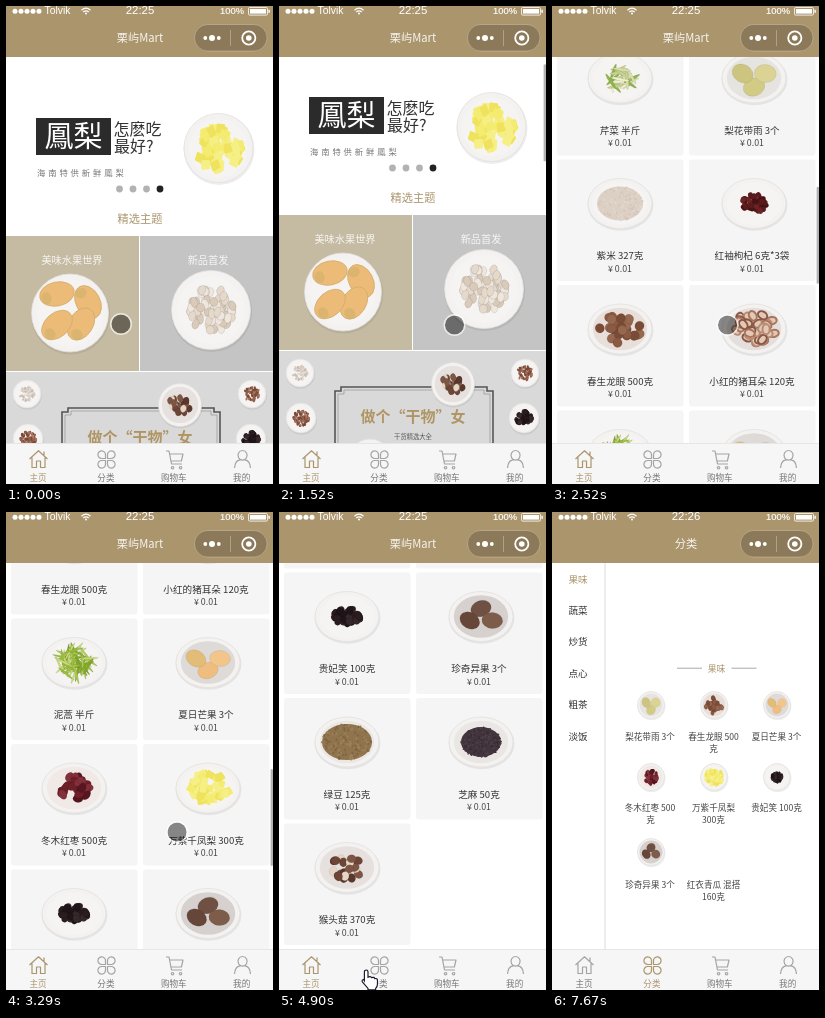
An HTML page for the animation above (7.99 s loop, 267 by 478 pixels).

```html
<!DOCTYPE html>
<html lang="zh">
<head>
<meta charset="utf-8">
<title>Shop</title>
<style>
html,body{margin:0;width:100%;height:100%;overflow:hidden;background:#fff}
svg{display:block;width:100vw;height:100vh}
text{font-family:"Noto Sans CJK SC","Noto Sans CJK",Inter,sans-serif;white-space:pre}
.bar{font-family:"Liberation Sans",Arial,sans-serif}
</style>
</head>
<body>
<svg id="stage" viewBox="0 0 267 478"></svg>
<script>
const LOOP = 7990, STEP = 76.875;
const GOLD = '#ab956d', GREY = '#a4a4a4';
const $ = id => document.getElementById(id);

let seed = 7;
const rnd = () => (seed = (seed * 16807) % 2147483647) / 2147483647;

// ---- drawing helpers ----
const txt = (x, y, size, fill, s, more = '') =>
  `<text x="${x}" y="${(y + size * .36).toFixed(1)}" font-size="${size}" fill="${fill}" text-anchor="middle" ${more}>${s}</text>`;
const rect = (x, y, w, h, fill, more = '') =>
  `<rect x="${x}" y="${y}" width="${w}" height="${h}" fill="${fill}" ${more}/>`;
const dot = (x, y, r, fill, more = '') =>
  `<circle cx="${x}" cy="${y}" r="${r}" fill="${fill}" ${more}/>`;
const oval = (x, y, rx, ry, fill, more = '') =>
  `<ellipse cx="${x}" cy="${y}" rx="${rx}" ry="${ry}" fill="${fill}" ${more}/>`;
const line = (d, stroke, w = 1, more = '') =>
  `<path d="${d}" fill="none" stroke="${stroke}" stroke-width="${w}" ${more}/>`;

// pieces, half width, half height, spread x, spread y, colours, shape, plate tint
const FOOD = {
  celery: [30, 9, 1.4, 12, 10, '#d9dfa6 #c6d28e #eef0cf #8fb54a'],
  pear: [3, 11, 9, 13, -9, '#d2cb85 #dad394 #cdc57f', '', '#e6e4e0'],
  rice: [150, 1.3, .8, 23, 17, '#dccfc3 #d4c5b8 #e3d8ce', 'grain'],
  goji: [40, 3.4, 2.6, 12, 9, '#5c1a1c #6b2423 #471316'],
  longan: [30, 4.8, 4.6, 21, 15, '#8a5a43 #976850 #7a4c36', '', '#e9dfda'],
  ears: [34, 5, 3.6, 23, 15, '#a8745c #b88b74 #8a5745', 'ring', '#e4dfdc'],
  wormwood: [56, 10, 1, 16, 13, '#9cc13a #aecb52 #84ad2c #c9dc7c'],
  mango: [3, 10.5, 8, 14, -8, '#efbd80 #f2c68a #e3bd78', '', '#dedad8'],
  date: [30, 5, 3.8, 15, 12, '#6e1f28 #82303a #571620', '', '#f0e9e6'],
  pine: [56, 4, 3.4, 21, 15, '#f4ec70 #f6ef86 #efe25c', 'cube'],
  black: [44, 3.8, 3.2, 13, 9, '#2a1c20 #36272b #1f1518'],
  kiwi: [3, 10.5, 8, 13, 8, '#6f5043 #7d5c4a #664638', '', '#d6d1cf'],
  bean: [200, 1.4, 1, 25, 18, '#8f744e #9c815a #806541', 'grain', '#ebe7e4'],
  sesame: [200, 1.1, .8, 20, 15, '#43353e #50414a #382b34', 'grain', '#e9e6e4'],
  mushroom: [22, 4.6, 4, 16, 11, '#6d4638 #7d5545 #5b382c #e6d6c6', '', '#e6e1de'],
  nut: [80, 3.3, 2.7, 18, 14, '#e5d9cc #efe7dd #dacab9'],
  pale: [60, 2.6, 1.8, 17, 13, '#dccfc5 #e6dcd3 #cfc2b6'],
  spice: [60, 3.2, 2.2, 17, 13, '#94604b #a8745c #7d4a38'],
};

function heap(kind) {
  const [n, w, h, sx, sy, cols, shape] = FOOD[kind], col = cols.split(' ');
  const few = n < 5, grain = shape === 'grain';
  const edge = grain ? '' : 'stroke="#000" stroke-opacity=".1" stroke-width=".6"';
  let out = grain ? oval(0, 0, sx, sy, col[0]) : '';
  for (let i = 0; i < n; i++) {
    const a = few ? i * 2 * Math.PI / n - Math.PI / 2 : rnd() * 7;
    const r = few ? 1 : Math.sqrt(rnd());
    const x = (Math.cos(a) * r * sx).toFixed(1), y = (Math.sin(a) * r * sy).toFixed(1);
    const c = col[i % col.length];
    const turn = `transform="translate(${x} ${y}) rotate(${few ? -20 + i * 25 : rnd() * 180 | 0})"`;
    if (shape === 'cube') out += rect(-w, -h, 2 * w, 2 * h, c, `rx="1" ${turn}`);
    else if (shape === 'ring') out += oval(0, 0, w, h, '#e2c8b5', `stroke="${c}" stroke-width="2" ${turn}`);
    else out += oval(0, 0, w, h, c, `${turn} ${edge}`);
  }
  return out;
}

function plate(x, y, rx, ry, kind, k = 1) {
  const tint = FOOD[kind][7] || '#f6f4f3';
  return `<g transform="translate(${x} ${y})">` +
    oval(.5, 1.4, rx * 1.03, ry * 1.03, '#000', 'opacity=".07"') +
    oval(0, 0, rx, ry, '#f4f2f0', 'stroke="#e4e0dd" stroke-width=".8"') +
    oval(0, 0, rx * .85, ry * .85, tint) +
    (k ? `<g transform="scale(${(rx / 32 * k).toFixed(3)} ${(ry / 25 * k).toFixed(3)})">${heap(kind)}</g>` : '') + '</g>';
}

// ---- home page ----
const GOODS = [
  ['芹菜 半斤', 'celery'], ['梨花带雨 3个', 'pear'],
  ['紫米 327克', 'rice'], ['红袖枸杞 6克*3袋', 'goji'],
  ['春生龙眼 500克', 'longan'], ['小红的猪耳朵 120克', 'ears'],
  ['泥蒿 半斤', 'wormwood'], ['夏日芒果 3个', 'mango'],
  ['冬木红枣 500克', 'date'], ['万紫千凤梨 300克', 'pine'],
  ['贵妃笑 100克', 'black'], ['珍奇异果 3个', 'kiwi'],
  ['绿豆 125克', 'bean'], ['芝麻 50克', 'sesame'],
  ['猴头菇 370克', 'mushroom'],
];

function home() {
  let s = rect(30, 112, 75, 37, '#2b2b2b') +
    txt(67.5, 130.5, 29, '#fff', '鳳梨') +
    txt(131.5, 123.5, 16, '#333', '怎麽吃', 'font-weight="500"') +
    txt(108, 140.5, 16, '#333', '最好?', 'font-weight="500" style="text-anchor:start"') +
    txt(31, 166.5, 8.3, '#777', '海南特供新鲜鳳梨', 'letter-spacing="2.9" style="text-anchor:start"') +
    plate(212.5, 142, 34.5, 34.5, 'pine');
  [113.5, 127, 140.5, 154].forEach((x, i) => s += dot(x, 183, 3.4, i < 3 ? '#b2b2b2' : '#222'));
  s += txt(134, 213, 11.2, GOLD, '精选主题');

  s += rect(0, 230, 133, 135, '#c5bba3') + rect(134, 230, 133, 135, '#c4c4c4') +
    txt(66, 254, 10.2, '#fff', '美味水果世界', 'opacity=".85"') +
    txt(202, 254, 10.2, '#fff', '新品首发', 'opacity=".85"') +
    plate(64, 307, 38.5, 39, 'nut', 0);
  [[51, 288, -12], [82, 296, 62], [75, 318, -58], [51, 319, -42]].forEach(([x, y, a]) =>
    s += `<g transform="translate(${x} ${y}) rotate(${a})">` +
      oval(0, 0, 17.5, 12, '#ecbb78', 'stroke="#d3ac6a" stroke-width=".8"') +
      oval(-11, 2, 5, 6, '#c3ad62', 'opacity=".4"') + '</g>');
  s += plate(205, 304, 39.5, 39.5, 'nut');

  s += rect(0, 366, 267, 125, '#d9d9d9') +
    line('M62 402H208V406H214V474H208V478H62V474H56V406H62Z', '#555', 1.6) +
    line('M65 405H205V409H211V471H205V475H65V471H59V409H65Z', '#888', .6) +
    plate(21, 388, 14, 14, 'pale') + plate(22, 433, 15, 15, 'spice') +
    plate(246, 388, 14, 14, 'spice') + plate(245, 433, 15, 15, 'black', 1.3) +
    plate(174, 399, 21.5, 21.5, 'mushroom') + plate(91, 475, 21, 21, 'pale') +
    txt(134, 432, 15, '#b09564', '做个“干物”女', 'font-weight="700"') +
    txt(134, 451.5, 6.3, '#555', '干货精选大全');
  s += txt(134, 509, 11.2, GOLD, '最近新品');

  GOODS.forEach(([name, kind], i) => {
    const y = 528 + (i >> 1) * 125.5, right = i % 2, cx = right ? 200 : 68;
    s += rect(right ? 137 : 5, y, 126.5, 121.5, '#f5f5f5', 'rx="3"') +
      plate(right ? 202 : 68, y + 44, 32, 25, kind) +
      txt(cx, y + 96, 9.6, '#333', name) +
      txt(cx, y + 109, 8.8, '#444', '¥ 0.01');
  });
  return s;
}

// ---- category page ----
const ITEMS = [
  ['梨花带雨 3个', '', 'pear'], ['春生龙眼 500', '克', 'longan'], ['夏日芒果 3个', '', 'mango'],
  ['冬木红枣 500', '克', 'date'], ['万紫千凤梨', '300克', 'pine'], ['贵妃笑 100克', '', 'black'],
  ['珍奇异果 3个', '', 'kiwi'], ['红衣青瓜 混搭', '160克', ''],
];

function category() {
  let s = rect(52.5, 51, 1, 387, '#dcdcdc');
  ['果味', '蔬菜', '炒货', '点心', '粗茶', '淡饭'].forEach((n, i) =>
    s += txt(26, 67 + i * 31.4, 9.6, i ? '#333' : GOLD, n));
  s += rect(125, 155.7, 25, 1, '#aaa') + rect(179.5, 155.7, 25, 1, '#aaa') +
    txt(164.5, 156.3, 8.8, GOLD, '果味');
  ITEMS.forEach(([a, b, kind], i) => {
    const x = 99 + i % 3 * 63, row = i / 3 | 0;
    const py = [193, 265, 340][row], ty = [225, 296, 373][row];
    if (kind) s += plate(x, py, 13.5, 13.5, kind);
    s += txt(x - (i % 3 ? .5 : 1), ty, 8.6, '#444', a) + txt(x - .5, ty + 11.5, 8.6, '#444', b);
  });
  return s;
}

// ---- fixed chrome ----
function header() {
  let s = rect(0, 0, 267, 51, GOLD);
  for (let i = 0; i < 5; i++) s += dot(9 + i * 6, 5.2, 2.5, '#fff');
  s += `<text class="bar" x="38.5" y="8.4" font-size="10.4" fill="#fff">Tolvik</text>` +
    line('M75.5 4.2Q80 .2 84.5 4.2M77.3 6Q80 3.6 82.7 6', '#fff', 1.2) + dot(80, 7.6, 1, '#fff') +
    `<text id="clock" class="bar" x="134" y="8.4" font-size="11.4" fill="#fff" text-anchor="middle">22:25</text>` +
    `<text class="bar" x="214" y="8.3" font-size="9.4" fill="#fff" stroke="#fff" stroke-width=".2">100%</text>` +
    rect(242.5, 1.5, 19, 7.6, 'none', 'rx="1.2" stroke="#fff" stroke-width=".8"') +
    rect(244, 3, 16, 4.6, '#fff') + rect(262.4, 3.8, 1.4, 3, '#fff');
  s += txt(134, 31.5, 11.2, '#fff', '', 'id="title" font-weight="500" opacity=".9"');
  s += rect(188.5, 18.5, 72.5, 26.5, 'rgba(0,0,0,.19)', 'rx="13.2" stroke="#fff" stroke-opacity=".25"') +
    dot(199.3, 32, 1.9, '#fff') + dot(206, 32, 3, '#fff') + dot(212.8, 32, 1.9, '#fff') +
    rect(224, 24, 1, 16, '#fff', 'opacity=".3"') +
    dot(242.8, 32, 6.6, 'none', 'stroke="#fff" stroke-width="1.8"') + dot(242.8, 32, 2.8, '#fff');
  return s;
}

const ICONS = [
  'M23.5 453L32.5 444.8L41.5 453M26 451.5V461.5H30.5V455H34.5V461.5H39V451.5M38 445.5V449',
  'M99.5 452.5H96A3.8 3.8 0 1 1 99.5 449ZM101.5 452.5H105A3.8 3.8 0 1 0 101.5 449ZM99.5 454.5H96A3.8 3.8 0 1 0 99.5 458ZM101.5 454.5H105A3.8 3.8 0 1 1 101.5 458Z',
  'M160 445H163L165.5 458H176M163.6 448H177L175.4 455H165M166.5 460.5a1.2 1.2 0 1 0 .1 0M174.5 460.5a1.2 1.2 0 1 0 .1 0',
  'M236.5 444.5a4.6 4.8 0 1 0 .1 0M228.5 462Q229 454.5 234 453.8M239 453.8Q244 454.5 244.5 462',
];

function tabs() {
  let s = rect(0, 437.5, 267, 41, '#f6f6f6') + rect(0, 437, 267, 1, '#e6e6e6');
  ['主页', '分类', '购物车', '我的'].forEach((n, i) =>
    s += line(ICONS[i], GREY, 1.2, `id="icon${i}" stroke-linejoin="round"`) +
      txt(32 + i * 67.9, 472, 8.6, '#777', n, `id="tab${i}"`));
  return s;
}

function loader() {
  let s = rect(82, 203.5, 104, 103.5, '#5b5b5b', 'rx="4"') + '<g id="spin">';
  for (let i = 0; i < 12; i++)
    s += rect(-1.1, -13, 2.2, 6.2, '#fff', `rx="1.1" opacity="${(.25 + i * .06).toFixed(2)}" transform="rotate(${i * 30})"`);
  return s + '</g>' + txt(134, 282.5, 13.6, '#fff', '加载中...');
}

const HAND = 'M-2 2a2 2 0 0 1 4 0v6q3-1.5 4 .5q3-1 3.5 1q3-.5 3 2v4q0 3-2 5v1.5h-8.5v-1.5l-6-7q-1.5-2.5 1-3l1 1.5z';

$('stage').innerHTML =
  '<clipPath id="view"><rect x="0" y="51" width="267" height="387"/></clipPath>' +
  rect(0, 0, 267, 478, '#fff') +
  `<g clip-path="url(#view)"><g id="home">${home()}</g></g><g id="cat">${category()}</g>` +
  rect(264.6, 0, 2.4, 97, '#000', 'id="thumb" rx="1.2"') +
  header() + tabs() + `<g id="load">${loader()}</g>` +
  `<g id="touch">${dot(0, 0, 9.6, 'rgba(0,0,0,.45)')}${dot(0, 0, 10.3, 'none', 'stroke="#fff" stroke-opacity=".65" stroke-width="1.5"')}</g>` +
  `<path id="hand" d="${HAND}" fill="#fff" stroke="#1a1a2e" stroke-width="1.3"/>`;

// ---- motion ----
const SCROLL = [[1210, 0], [1290, 4], [1440, 13], [1520, 21], [1600, 85], [1670, 150], [1828, 150], [2130, 480],
  [2445, 480], [2520, 500], [2900, 740], [3135, 740], [3212, 764], [3290, 799], [3440, 990], [3750, 990], [3980, 1095]];
const POINTER = [[0, 115, 318], [70, 125, 296], [140, 146, 246], [210, 163, 204], [368, 163, 204], [520, 120, 225],
  [680, 77, 275], [830, 95, 330], [980, 140, 348], [1060, 175, 345], [1130, 186, 335], [1210, 175.5, 319],
  [3135, 175.5, 319], [3290, 171, 320], [4210, 171, 322], [4290, 171, 322], [4520, 150, 360], [4680, 115, 420],
  [4825, 83, 452], [4900, 87, 458], [4980, 95, 458], [5058, 95, 458], [5290, 101, 450], [5364, 101, 450],
  [5520, 135, 390], [5670, 197, 244], [6978, 197, 244], [7130, 150, 310], [7210, 97, 343], [7360, 170, 230],
  [7440, 230, 190], [7516, 290, 190]];

function at(table, t, k = 1) {
  const i = table.findIndex(p => p[0] > t);
  if (i < 0) return table[table.length - 1][k];
  if (!i) return table[0][k];
  const a = table[i - 1], b = table[i];
  return a[k] + (b[k] - a[k]) * (t - a[0]) / (b[0] - a[0]);
}

const show = (id, on) => $(id).setAttribute('visibility', on ? 'visible' : 'hidden');
const move = (id, x, y, more = '') => $(id).setAttribute('transform', `translate(${x} ${y}) ${more}`);

function draw(ms) {
  const t = Math.max(0, Math.floor((ms + 22) / STEP) * STEP - 18);
  const y = Math.round(at(SCROLL, t)), sorted = t > 5430;
  move('home', 0, -y);
  show('home', t < 6120);
  show('cat', t > 6430);
  show('load', t > 6120 && t < 6430);
  move('spin', 134, 245, `rotate(${Math.min(2, Math.floor((t - 6120) / STEP)) * 30})`);

  $('thumb').setAttribute('y', 53 + .2555 * y);
  $('thumb').setAttribute('opacity', t < 1280 ? 0 : .3 * Math.max(0, Math.min(1, (4530 - t) / 240)));

  $('title').textContent = sorted ? '分类' : '栗屿Mart';
  $('clock').textContent = t > 7660 ? '22:26' : '22:25';
  [0, 1].forEach(i => {
    const on = i === +sorted;
    $('icon' + i).setAttribute('stroke', on ? GOLD : GREY);
    $('tab' + i).setAttribute('fill', on ? GOLD : '#777');
  });

  const px = at(POINTER, t, 1), py = at(POINTER, t, 2);
  show('touch', py < 438);
  show('hand', py >= 438);
  move('touch', px, py);
  move('hand', px, py, 'scale(.9)');
}

const start = performance.now();
function tick() {
  draw((performance.now() - start) % LOOP);
  requestAnimationFrame(tick);
}
draw(0);
requestAnimationFrame(tick);
</script>
</body>
</html>
```
